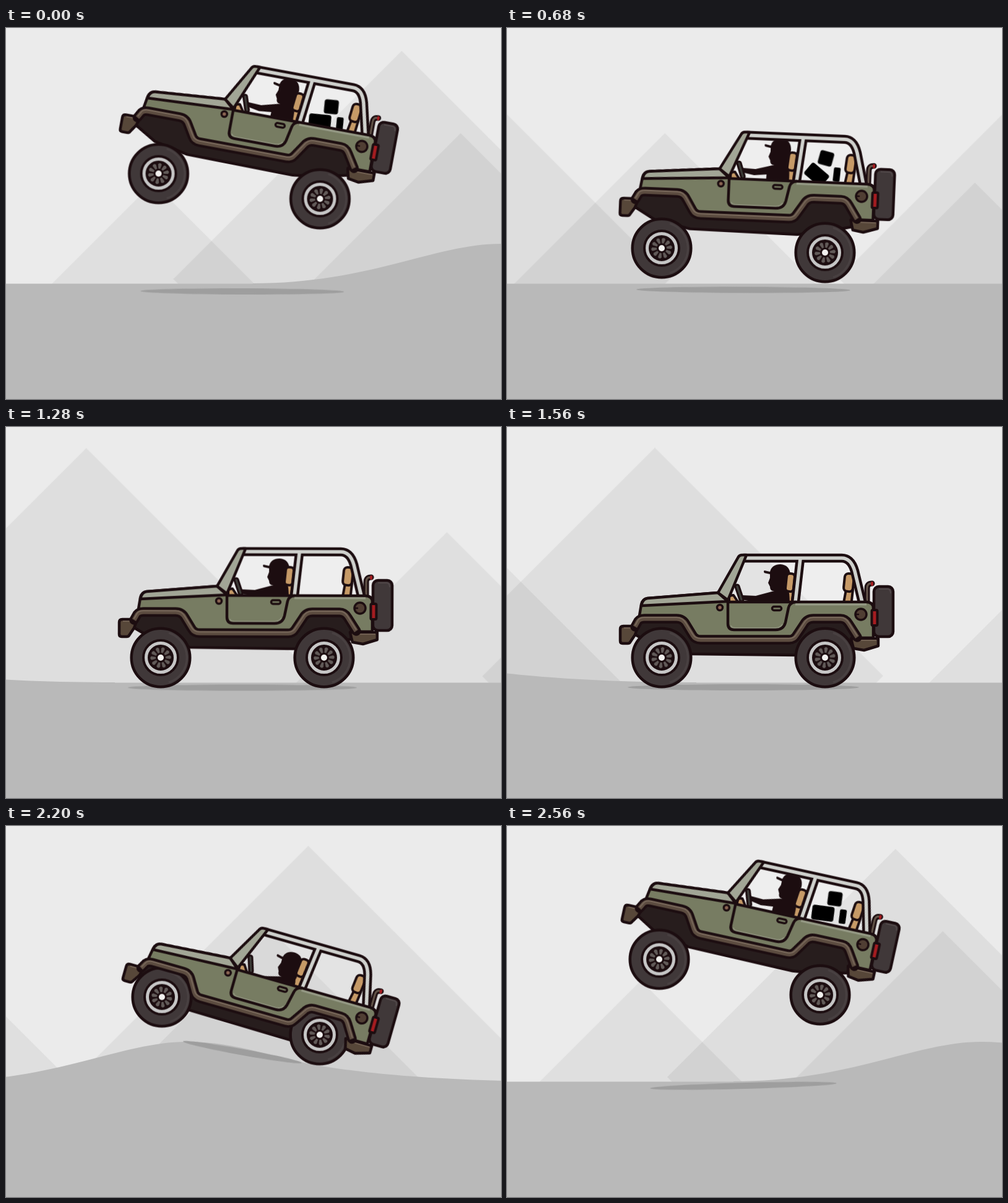
Write an HTML page without scripts that moves like this. It is 800 px wide and 600 px high and loops after 2600 ms.

```html
<!DOCTYPE html>
<html lang="en">
<head>
<meta charset="utf-8">
<title>Off-road ride</title>
<style>
html, body { margin: 0; width: 100%; height: 100%; overflow: hidden; background: #ebebeb; }
svg { display: block; width: 100vw; height: 100vh; }
.far, .near, .hill, .shadow, .body, .front, .rear, .driver, .cargo, .tumble, .spin {
  animation: 2.6s linear infinite;
}
.far { animation-name: far; }
.near { animation-name: near; }
.hill { animation-name: hill; }
.shadow { animation-name: shadow; }
.body { animation-name: body; transform-origin: 458px 330px; }
.front { animation-name: front; }
.rear { animation-name: rear; }
.driver { animation-name: driver; }
.cargo { animation-name: cargo; }
.tumble { animation-name: tumble; transform-box: fill-box; transform-origin: center; }
.spin { animation-name: spin; }

.line { fill: none; stroke: #1c0d10; stroke-width: 4.5; stroke-linecap: round; stroke-linejoin: round; }
.part { stroke: #1c0d10; stroke-width: 4.5; stroke-linejoin: round; }
.trim { fill: #574739; }
.tan { fill: #c69a67; stroke-width: 4; }
.rubber { fill: #403839; }
.pale { fill: #a2a696; }
.ink { fill: #1c0d10; }
.bar { fill: none; stroke-linejoin: round; }

@keyframes far {
  84.6% { transform: translate(858px, -5px); }
  98.4% { transform: translate(997px, 0); }
  100% { transform: translate(1012px, 0); }
}
@keyframes near { to { transform: translateX(1982px); } }
@keyframes spin { to { transform: rotate(-2340deg); } }
@keyframes hill {
  0%, 100% { transform: translateX(798px); }
  10.77% { transform: translateX(1064px); }
  20% { transform: translateX(1300px); }
  20.01% { transform: translateX(-760px); }
  30.8% { transform: translateX(-600px); }
  38.46% { transform: translateX(-500px); }
  49.2% { transform: translateX(-425px); }
  60% { transform: translateX(-295px); }
  72.3% { transform: translateX(-45px); }
  84.6% { transform: translateX(290px); }
  91.5% { transform: translateX(520px); }
  98.46% { transform: translateX(765px); }
}
@keyframes shadow {
  0%, 100% { transform: translate(382px, 426px) rotate(.2deg) scaleX(.88); }
  10.77% { transform: translate(382px, 425px) rotate(0deg) scaleX(1.07); }
  26.15% { transform: translate(382px, 423.5px) rotate(.2deg) scaleX(.925); }
  38.46% { transform: translate(382px, 422px) rotate(0deg) scaleX(.98); }
  60% { transform: translate(382px, 421px) rotate(0deg) scaleX(1); }
  72.3% { transform: translate(382px, 416px) rotate(2deg) scaleX(.95); }
  78.5% { transform: translate(382px, 400px) rotate(6deg) scaleX(.75); }
  84.6% { transform: translate(382px, 365.5px) rotate(10.4deg) scaleX(.52); }
  92.3% { transform: translate(382px, 395px) rotate(-10deg) scaleX(.72); }
  98.46% { transform: translate(382px, 420px) rotate(-1.6deg) scaleX(.805); }
}
@keyframes body {
  0%, 100% { transform: translateY(-133px) rotate(10.5deg); }
  3.85% { transform: translateY(-100px) rotate(8.5deg); }
  5.8% { transform: translateY(-70px) rotate(6.3deg); }
  7.7% { transform: translateY(-28px) rotate(3.7deg); }
  9.2% { transform: translateY(8px) rotate(2deg); }
  10.77% { transform: translateY(30.5px) rotate(.9deg); }
  12.3% { transform: translateY(35px) rotate(.6deg); }
  16.9% { transform: translateY(8px) rotate(.9deg); }
  21.5% { transform: translateY(-22px) rotate(1.8deg); }
  26.15% { transform: translateY(-35.5px) rotate(2.4deg); }
  27.7% { transform: translateY(-37px) rotate(2.3deg); }
  30.8% { transform: translateY(-30px) rotate(1.8deg); }
  34.6% { transform: translateY(-10px) rotate(1deg); }
  38.46% { transform: translateY(1.5px) rotate(.4deg); }
  41.5% { transform: translateY(7px) rotate(0deg); }
  46.2% { transform: translateY(-3px) rotate(0deg); }
  50.4% { transform: translateY(-13px) rotate(.2deg); }
  55.4% { transform: translateY(-7px) rotate(0deg); }
  60% { transform: translateY(0) rotate(0deg); }
  65.4% { transform: translateY(1px) rotate(.6deg); }
  72.3% { transform: translateY(-4px) rotate(4deg); }
  78.5% { transform: translateY(-12px) rotate(9.5deg); }
  84.6% { transform: translateY(-24.3px) rotate(15.9deg); }
  88.5% { transform: translateY(-62px) rotate(16deg); }
  92.3% { transform: translateY(-100px) rotate(15deg); }
  95.4% { transform: translateY(-124px) rotate(13.9deg); }
  98.46% { transform: translateY(-136.3px) rotate(12.45deg); }
}
@keyframes front {
  0%, 100% { transform: translate(-3.5px, -138px); }
  3.85% { transform: translate(-2px, -94px); }
  5.8% { transform: translate(-1px, -59px); }
  8%, 20% { transform: none; }
  24% { transform: translate(0, -14px); }
  27% { transform: translate(0, -18px); }
  30% { transform: translate(0, -12px); }
  33%, 62.3% { transform: none; }
  72.3% { transform: translate(0, -13px); }
  78.5% { transform: translate(0, -42px); }
  84.6% { transform: translate(2px, -96px); }
  88.5% { transform: translate(0, -128px); }
  92.3% { transform: translate(-2px, -153px); }
  96% { transform: translate(-4px, -163px); }
  98.46% { transform: translate(-4px, -158px); }
}
@keyframes rear {
  0%, 100% { transform: translate(-6.5px, -97px); }
  3.85% { transform: translate(-4px, -68px); }
  5.8% { transform: translate(-2px, -39px); }
  7.7%, 21.5% { transform: none; }
  26.5% { transform: translate(0, -10.5px); }
  31.5%, 72.3% { transform: none; }
  78.5% { transform: translate(-2px, -7px); }
  84.6% { transform: translate(-7px, -35px); }
  88.5% { transform: translate(-8px, -62px); }
  92.3% { transform: translate(-8px, -85px); }
  98.46% { transform: translate(-8px, -100px); }
}
@keyframes driver {
  0%, 6%, 100% { transform: translate(-2px, -6px); }
  10.8%, 17% { transform: translate(0, 2.5px); }
  26.2%, 30% { transform: translate(-3px, -7px); }
  38.5% { transform: translate(0, 2px); }
  60% { transform: none; }
  84.6% { transform: translate(-3px, 9px); }
  92.3% { transform: translate(-3px, 0); }
  98.46% { transform: translate(-3px, -7px); }
}
@keyframes cargo {
  0%, 100% { transform: none; }
  6% { transform: translateY(5px); }
  10.8% { transform: translateY(31px); }
  13%, 16% { transform: translateY(55px); }
  21.5% { transform: translateY(10px); }
  26.2% { transform: translateY(-5px); }
  30% { transform: none; }
  34.6% { transform: translateY(45px); }
  37%, 87% { transform: translateY(64px); }
  92.3% { transform: translateY(20px); }
  98.46% { transform: translateY(-9px); }
}
@keyframes tumble {
  0%, 40%, 100% { transform: rotate(-5deg); }
  10.8% { transform: rotate(calc(var(--turn) * .6)); }
  26.2% { transform: rotate(var(--turn)); }
}
</style>
</head>
<body>
<svg viewBox="0 0 800 600" preserveAspectRatio="none">
  <defs>
    <path id="diamond" d="M0 37 369 406 0 775-369 406Z"/>
    <path id="tall" d="M0 170 260 430H-260Z"/>
    <path id="small" d="M0 250 180 430H-180Z"/>
    <path id="spoke" d="M-1.500-8-3-15Q0-19 3-15L1.500-8Z" fill="#625b59"/>
    <g id="spokes">
      <use href="#spoke" transform="rotate(18)"/>
      <use href="#spoke" transform="rotate(54)"/>
      <use href="#spoke" transform="rotate(90)"/>
      <use href="#spoke" transform="rotate(126)"/>
      <use href="#spoke" transform="rotate(162)"/>
    </g>
    <g id="wheel">
      <circle class="part rubber" r="47.300"/>
      <path d="M13-40A42 42 0 0 1 13 40" fill="none" stroke="#494142" stroke-width="3"/>
      <circle class="ink" r="30"/>
      <circle class="ink" r="23.500" stroke="#c6c6c6" stroke-width="5"/>
      <g class="spin">
        <use href="#spokes"/>
        <use href="#spokes" transform="rotate(180)"/>
      </g>
      <circle r="5" fill="#f1f0ee"/>
    </g>
    <path id="flare" d="M207 323 212 314Q215 310 222 310H274Q284 310 289 319L300 337Q304 344 313 344H456Q464 344 468 337L480 319Q485 310 495 310H539Q547 310 552 318L566 340"/>
    <path id="rollbar" d="M382 212H541Q556 212 562 233L574 283"/>
    <path id="pillar" d="M474 213 466 283"/>
    <clipPath id="cabin"><path d="M340 150H600V283H340Z"/></clipPath>
  </defs>

  <rect width="800" height="600" fill="#ebebeb"/>
  <g class="far" fill-opacity=".055">
    <use href="#diamond" x="-370"/>
    <use href="#diamond" x="639"/>
  </g>
  <g class="near" fill-opacity=".052">
    <use href="#tall" x="734"/>
    <use href="#tall" x="-264"/>
    <use href="#tall" x="-1248"/>
    <use href="#small" x="237"/>
    <use href="#small" x="-1736"/>
  </g>

  <g fill="#b9b9b9">
    <path class="hill" d="M-400 413C-212 413-105 349 0 349 80 349 130 372 200 385S400 413 600 413V420H-400Z"/>
    <path d="M0 413.500H800V600H0Z"/>
  </g>
  <ellipse class="shadow" rx="187" ry="5" fill="#9e9e9e"/>

  <g class="body">
    <path class="part" fill="#271d1d" d="M206 320V335L242 356 297 367 470 369 510 364 558 353V330L540 309H490L465 344H305L280 309H215Z"/>
  </g>
  <g class="front"><use href="#wheel" x="250" y="373"/></g>
  <g class="rear"><use href="#wheel" x="514" y="373"/></g>

  <g class="body">
    <path d="M386 214H540Q553 214 558 236L569 282H357Z" fill="#fff" fill-opacity=".15"/>
    <g clip-path="url(#cabin)">
      <path class="part tan" d="M359 284V275Q360 272 366 272L374 284Z"/>
      <path class="part tan" d="M548 263H559L556 290H543Z"/>
      <rect class="part tan" x="545" y="237" width="15" height="29" rx="6" transform="rotate(6 552 251)"/>
      <g class="cargo">
        <rect class="tumble" style="--turn:13deg" x="500.500" y="237.500" width="23" height="23" rx="4"/>
        <rect class="tumble" style="--turn:38deg" x="480" y="264" width="36" height="24" rx="4"/>
        <rect class="tumble" style="--turn:4deg" x="525" y="263" width="11" height="23" rx="2.500"/>
      </g>
      <path class="part tan" d="M451 264H463L460 290H448Z"/>
      <g class="driver ink">
        <path d="M416 232 425 234Q428 222 442 222 457 223 458 239L455 264Q458 275 456 305H419L420 281 400 283 379 279 380 272 402 273 432 265Q425 266 425 258L422 252 425 244V238L416 236Q414 233 416 232Z"/>
      </g>
      <rect class="part tan" x="451" y="237" width="13" height="29" rx="5" transform="rotate(6 457 251)"/>
      <path d="M372 258 379 279" class="line" style="stroke-width:9"/>
      <path d="M372 258 379 279" class="line" style="stroke:#3d3d39;stroke-width:3"/>
    </g>

    <path d="M582 288V261Q582 253 590 253" class="line" style="stroke-width:9"/>
    <path d="M582 288V261Q582 253 588 253" class="line" style="stroke:#65564a;stroke-width:3"/>
    <path d="M590 252V255" class="line" style="stroke:#a51c20;stroke-width:4"/>

    <g class="bar" stroke="#1c0d10" stroke-width="14.500">
      <use href="#rollbar"/><use href="#pillar"/>
    </g>
    <g class="bar" stroke="#cfd1cd" stroke-width="5.500">
      <use href="#rollbar"/><use href="#pillar"/>
    </g>

    <path class="part" fill="#777c62" d="M213 311 217 287Q219 278 227 277L341 268 357 283H580Q592 283 592 293V341H566L552 317Q547 309 539 309H495Q485 309 480 318L468 337Q464 344 456 344H313Q304 344 300 337L289 318Q284 309 274 309H222Z"/>
    <path class="part pale" d="M217 289Q219 278 227 277L341 268 357 282Z"/>
    <path class="part pale" d="M341 268 374 210Q376 207 380 207H387L357 280Z"/>
    <path d="M466 287H581" stroke="#979b87" stroke-width="3"/>
    <path d="M362 321Q363 325 369 325H434Q442 325 445 319" fill="none" stroke="#8f937d" stroke-width="2"/>
    <path class="line" d="M357 283V318Q357 328 367 328H434Q447 328 450 316L455 292Q457 284 466 283"/>
    <rect class="part" x="428.500" y="290.500" width="15" height="6" rx="3" fill="#777c62" style="stroke-width:3.500"/>
    <circle class="part" cx="344" cy="292" r="4.500" fill="#8b6553" style="stroke-width:3.500"/>
    <circle class="part" cx="572" cy="303" r="9" fill="#503e33" style="stroke-width:3.500"/>
    <path class="line" d="M565 303H568" style="stroke-width:2.500"/>

    <path class="part trim" d="M188 322H212L207 336 199 348Q198 350 195 350H187Q183 350 183 346V327Q183 322 188 322Z"/>
    <path class="part trim" d="M556 342H600V354L577 361 560 358Z"/>
    <path d="M189 325H208M561 345H597" stroke="#716052" stroke-width="2"/>

    <use href="#flare" class="bar" stroke="#1c0d10" stroke-width="15.500" stroke-linecap="round"/>
    <use href="#flare" class="bar" stroke="#5c4c40" stroke-width="7"/>
    <use href="#flare" class="bar" stroke="#78685a" stroke-width="2" y="-2"/>

    <rect class="part rubber" x="593" y="258" width="31" height="81" rx="8"/>
    <path d="M601 262H616Q620 263 620 269" fill="none" stroke="#514849" stroke-width="2"/>
    <rect class="part" x="589.500" y="296" width="9" height="25" rx="2" fill="#a51c20" style="stroke-width:4"/>
  </g>
</svg>
</body>
</html>
```
